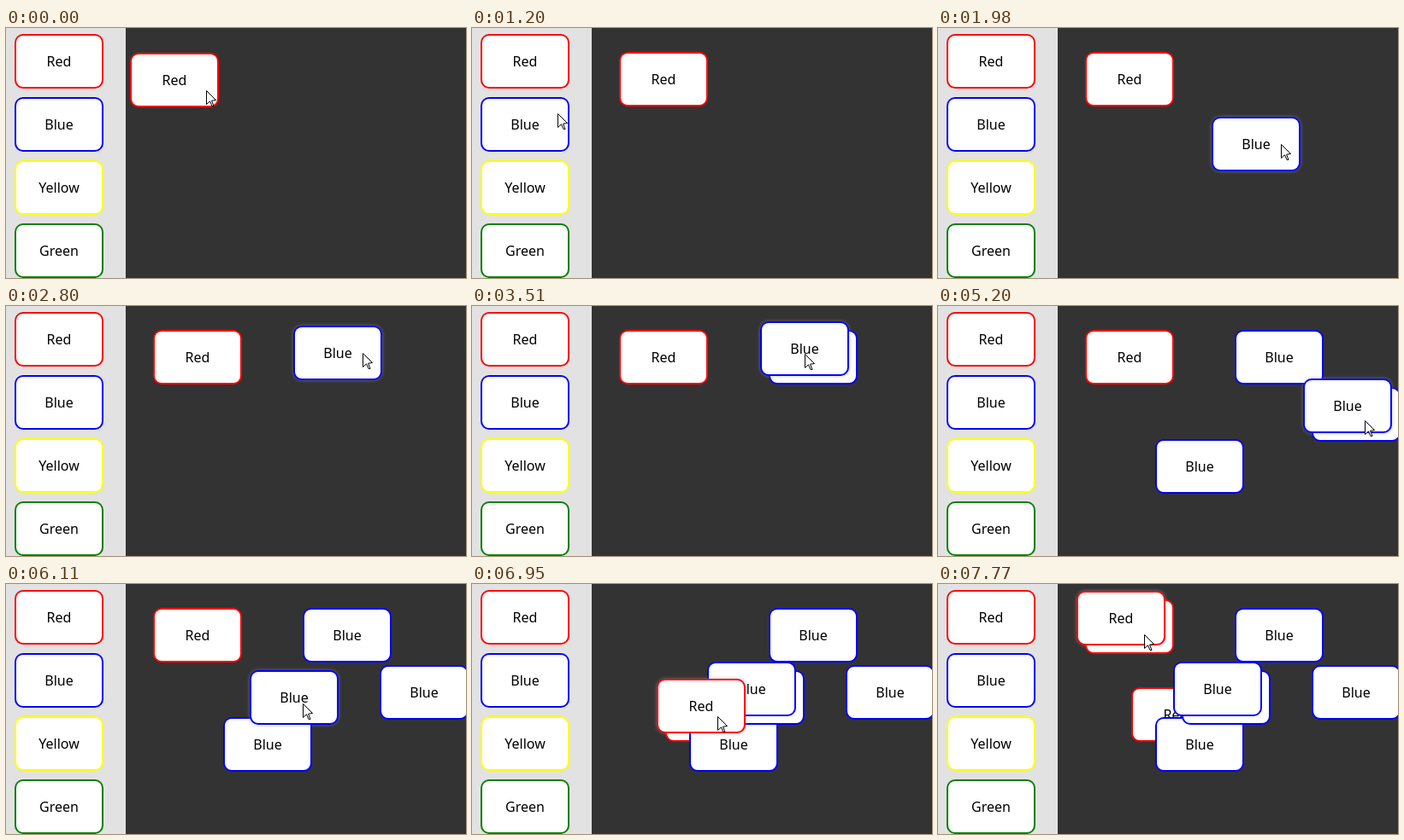
Write an HTML page with a canvas that moves like this. It is 538 px wide and 293 px high and loops after 8000 ms.

```html
<!DOCTYPE html>
<html lang="en">
<head>
<meta charset="utf-8">
<title>Drag and copy cards</title>
<style>
  html, body { margin: 0; width: 100%; height: 100%; overflow: hidden; background: #333; }
  canvas { display: block; }
</style>
</head>
<body>
<canvas id="stage" width="538" height="293"></canvas>
<script>
const LOOP = 8000;
const STEP = 130;   // time between two visible moves
const MARGIN = 10;  // a lifted card hangs this far up and left of its resting place
const W = 104, H = 64;
const ctx = document.getElementById('stage').getContext('2d');

const cards = [];                  // bottom to top
const pointer = [[0, 234, 73]];    // time, x, y, card under the pointer

// Eased steps from a to b, about one per STEP; the first one already moves.
function glide(t0, t1, [ax, ay], [bx, by]) {
  const n = Math.round((t1 - t0) / STEP) + 1;
  const gap = (t1 - t0) / Math.max(1, n - 1);
  return Array.from({ length: n }, (_, i) => {
    const p = (i + 1) / n, e = p * p * (3 - 2 * p);
    return [t0 + gap * i, Math.round(ax + (bx - ax) * e), Math.round(ay + (by - ay) * e)];
  });
}

const restOf = card => card.keys.at(-1).slice(1);

function addCard(label, t, x, y) {
  const card = { label, keys: [[t, x, y]] };
  cards.push(card);
  return card;
}

// Move a card along legs [from time, to time, x, y] with the pointer holding it.
function move(card, [gx, gy], ...legs) {
  for (const [t0, t1, x, y] of legs) {
    for (const key of glide(t0, t1, restOf(card), [x, y])) {
      card.keys.push(key);
      pointer.push([key[0], key[1] + gx, key[2] + gy, card]);
    }
  }
}

// Press a card: a lifted copy follows the pointer and is dropped after the last leg.
function dragCopy(source, [gx, gy], press, ...legs) {
  const [x, y] = restOf(source).map(v => v - MARGIN);
  const copy = addCard(source.label, press, x, y);
  move(copy, [gx + MARGIN, gy + MARGIN], [press, press, x, y], ...legs);
  if (legs.length) {
    const [lx, ly] = restOf(copy);
    copy.keys.push([legs.at(-1)[1] + STEP, lx + MARGIN, ly + MARGIN]);
  }
  return copy;
}

const palette = ['Red', 'Blue', 'Yellow', 'Green'].map((label, i) =>
  ({ label, keys: [[0, 10, 7 + 74 * i]] }));

const red = addCard('Red', 0, 145, 29);
move(red, [89, 44], [140, 270, 180, 41], [400, 530, 172, 28]);
pointer.push(...glide(810, 1330, [261, 72], [81, 103]));

const first = dragCopy(palette[1], [71, 22], 1480,
  [1480, 1740, 320, 112], [1860, 1980, 320, 104], [2100, 2920, 337, 18]);
const second = dragCopy(first, [42, 28], 3510, [3660, 3910, 244, 146]);
const third = dragCopy(second, [50, 36], 4170, [4570, 4950, 427, 85]);
const fourth = dragCopy(third, [62, 39], 5200, [5710, 5970, 275, 91]);
dragCopy(fourth, [62, 39], 6250);

move(red, [61, 34], [6400, 6400, 172, 28], [6540, 6800, 226, 121]);
const redCopy = dragCopy(red, [61, 34], 6950, [7230, 7490, 162, 8]);
dragCopy(redCopy, [69, 41], 7770);

const keyAt = (keys, t) => keys.findLast(key => key[0] <= t);

function drawCard({ label, keys }, t, glow) {
  const key = keyAt(keys, t);
  if (!key) return;
  const [, x, y] = key, color = label.toLowerCase();

  ctx.save();
  if (glow) {
    ctx.shadowColor = 'rgba(150, 150, 165, 0.55)';
    ctx.shadowBlur = 4;
  }
  ctx.fillStyle = color;
  ctx.beginPath();
  ctx.roundRect(x, y, W, H, 10);
  ctx.fill();
  ctx.restore();

  ctx.fillStyle = '#fff';
  ctx.beginPath();
  ctx.roundRect(x + 2, y + 2, W - 4, H - 4, 8);
  ctx.fill();
  ctx.fillStyle = '#000';
  ctx.fillText(label, x + W / 2, y + 38);
}

const arrow = new Path2D('M.5 .5V16.5L4.5 12.8L7 18.5H9L6.6 12.2L11.5 11.5Z');

function drawPointer(x, y) {
  ctx.save();
  ctx.translate(x, y);
  ctx.fillStyle = '#fff';
  ctx.fill(arrow);
  ctx.strokeStyle = '#000';
  ctx.lineWidth = 1;
  ctx.stroke(arrow);
  ctx.restore();
}

function draw(t) {
  ctx.fillStyle = '#333';
  ctx.fillRect(0, 0, 538, 293);
  ctx.fillStyle = '#e2e2e2';
  ctx.fillRect(0, 0, 140, 293);
  ctx.font = '16px "Noto Sans", "Open Sans", sans-serif';
  ctx.textAlign = 'center';

  const [, px, py, held] = keyAt(pointer, t);
  for (const card of [...palette, ...cards]) drawCard(card, t, card === held);
  drawPointer(px, py);
}

const start = performance.now();
function tick() {
  draw((performance.now() - start) % LOOP);
  requestAnimationFrame(tick);
}
tick();
</script>
</body>
</html>
```
